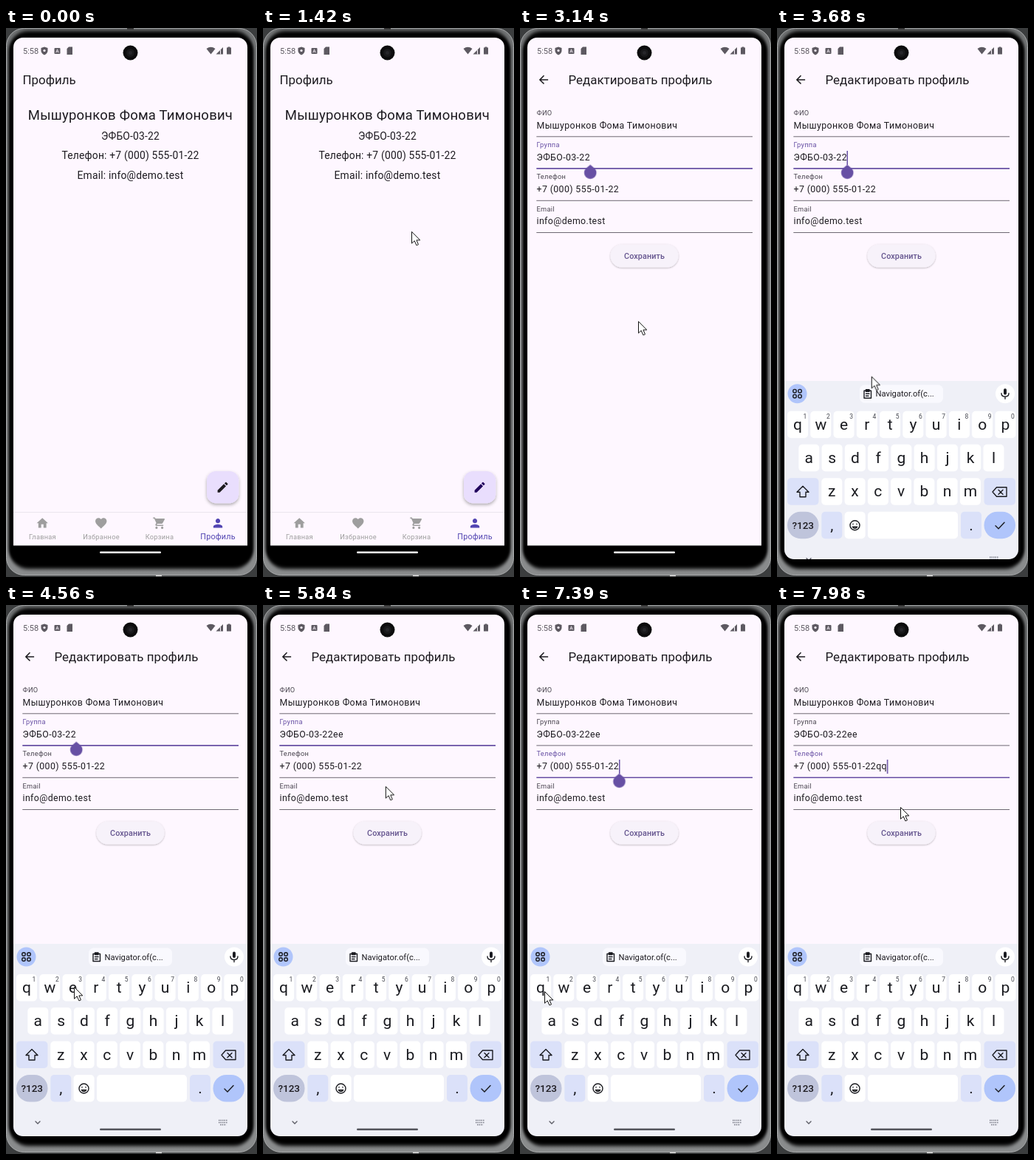
An HTML page that plays this animation: 340 by 742 pixels, repeating every 8000 ms.

```html
<!DOCTYPE html>
<html lang="ru">
<head>
<meta charset="utf-8">
<title>Профиль</title>
<style>
html, body { margin: 0; width: 100%; height: 100%; overflow: hidden; background: #3b3d3e; }
svg { display: block; }
text { font-family: Roboto, sans-serif; fill: #1d1b20; }
.mid { text-anchor: middle; }
.title { font-size: 16.9px; }
.info { font-size: 13.88px; letter-spacing: .19px; }
.label { font-size: 9.25px; letter-spacing: .3px; fill: currentColor; }
.value { font-size: 12.34px; letter-spacing: .39px; }
.tab { font-size: 9.25px; letter-spacing: .25px; fill: #9e9e9e; }
.key { font-size: 21px; fill: #1a1b20; }
.hint { font-size: 8.5px; fill: #44464f; }
.field { color: #49454f; stroke-width: .8px; }
.field line { stroke: currentColor; }
.accent { fill: #6750a4; }
.line { fill: none; stroke: #1a1b20; stroke-width: 1.4; stroke-linecap: round; stroke-linejoin: round; }

.step { animation: 8s step-end infinite; }
.pencil { animation-name: pencil; }
.profile { animation-name: profile; }
.edit { animation-name: edit; }
.group { animation-name: group; }
.phone { animation-name: phone; }
.grip1 { animation-name: grip1; }
.grip2 { animation-name: grip2; }
.caret1 { animation-name: caret1; }
.caret2 { animation-name: caret2; }
.e1 { animation-name: e1; }
.e2 { animation-name: e2; }
.q1 { animation-name: q1; }
.q2 { animation-name: q2; }
.press-e { animation-name: pressE; }
.press-q { animation-name: pressQ; }
.keyboard { animation: keyboard 8s linear infinite; }
.cursor { animation: cursor 8s linear infinite; }

@keyframes pencil { 0% { fill: #1d1b20; } 9%, 100% { fill: #21005d; } }
@keyframes profile { 0% { visibility: visible; } 18.625%, 100% { visibility: hidden; } }
@keyframes edit { 0% { opacity: 0; } 18.625%, 100% { opacity: 1; } }
@keyframes group {
  0%, 75.75%, 100% { color: #49454f; stroke-width: .8px; }
  35% { color: #6750a4; stroke-width: 1.6px; }
}
@keyframes phone {
  0% { color: #49454f; stroke-width: .8px; }
  75.75%, 100% { color: #6750a4; stroke-width: 1.6px; }
}
@keyframes grip1 { 0%, 58.75%, 100% { opacity: 0; } 35% { opacity: 1; } }
@keyframes grip2 { 0%, 94%, 100% { opacity: 0; } 75.75% { opacity: 1; } }
@keyframes caret1 {
  0%, 38.75%, 51.125% { opacity: 0; transform: none; }
  35%, 45.125%, 57.875% { opacity: 1; transform: none; }
  58.75% { opacity: 1; transform: translateX(7px); }
  62% { opacity: 1; transform: translateX(14px); }
  68.375%, 100% { opacity: 0; transform: translateX(14px); }
}
@keyframes caret2 {
  0%, 81.375% { opacity: 0; transform: none; }
  75.75%, 87.375% { opacity: 1; transform: none; }
  94% { opacity: 1; transform: translateX(7.4px); }
  95.75%, 100% { opacity: 1; transform: translateX(14.8px); }
}
@keyframes e1 { 0% { visibility: hidden; } 58.75%, 100% { visibility: visible; } }
@keyframes e2 { 0% { visibility: hidden; } 62%, 100% { visibility: visible; } }
@keyframes q1 { 0% { visibility: hidden; } 94%, 100% { visibility: visible; } }
@keyframes q2 { 0% { visibility: hidden; } 95.75%, 100% { visibility: visible; } }
@keyframes pressE { 0%, 58.75%, 62%, 100% { opacity: 0; } 57.875%, 61.125% { opacity: .1; } }
@keyframes pressQ { 0%, 94%, 95.75%, 100% { opacity: 0; } 93.125%, 94.875% { opacity: .1; } }
@keyframes keyboard {
  0%, 42.875% { transform: translateY(262px); animation-timing-function: ease-out; }
  46.875%, 100% { transform: none; }
}
@keyframes cursor {
  0%, 2.4% { transform: translate(345px, 745px); }
  2.5% { transform: translate(336px, 732px); }
  5.625% { transform: translate(312px, 640px); }
  8.125% { transform: translate(293px, 570px); }
  11.75%, 13.5% { transform: translate(291px, 615px); }
  17.75% { transform: translate(201px, 275px); }
  19.5% { transform: translate(193px, 242px); }
  21.25% { transform: translate(190px, 238px); }
  24.875%, 27.375% { transform: translate(139px, 175px); }
  29.75% { transform: translate(125px, 160px); }
  33.25% { transform: translate(172px, 263px); }
  35% { transform: translate(172px, 280px); }
  39.25% { transform: translate(160px, 396px); }
  44.25% { transform: translate(140px, 455px); }
  51.125%, 62.5% { transform: translate(92px, 516px); }
  70.5% { transform: translate(181px, 262px); }
  73% { transform: translate(166px, 245px); }
  75%, 76.625% { transform: translate(134px, 216px); }
  80.5% { transform: translate(42px, 508px); }
  82.5%, 95.5% { transform: translate(33px, 522px); }
  99.75%, 100% { transform: translate(167px, 273px); }
}
</style>
</head>
<body>
<svg width="340" height="742" viewBox="0 0 340 742">
  <defs>
    <clipPath id="screen"><rect x="10" y="13" width="317" height="705" rx="13"/></clipPath>
    <filter id="shadow" x="-30%" y="-30%" width="160%" height="180%">
      <feDropShadow dx="0" dy="2.2" stdDeviation="2" flood-opacity=".32"/>
    </filter>
    <filter id="soft" x="-10%" y="-20%" width="120%" height="160%">
      <feDropShadow dx="0" dy=".8" stdDeviation=".8" flood-opacity=".3"/>
    </filter>
    <filter id="bevel"><feGaussianBlur stdDeviation="1.5 2.5"/></filter>
    <linearGradient id="metal" x2="0" y2="1">
      <stop stop-color="#707273"/><stop offset="1" stop-color="#8a8c8d"/>
    </linearGradient>
    <path id="grip" d="M0 0 5.9 5.1A8.3 8.3 0 1 1-5.9 5.1Z"/>
  </defs>

  <!-- phone body -->
  <rect x=".5" y=".5" width="339" height="739" rx="24" fill="url(#metal)" stroke="#a8aaab"/>
  <rect x="3.500" y="4" width="332" height="727" rx="27" filter="url(#bevel)"/>
  <path d="M164 1h9" stroke="#333" stroke-width="2"/>
  <path d="M203 740h8" stroke="#ccc" stroke-width="2"/>

  <g clip-path="url(#screen)">
    <rect x="10" y="13" width="317" height="705"/>
    <rect x="10" y="13" width="317" height="686.5" fill="#fef7ff"/>
    <rect x="127" y="707.5" width="83" height="2.5" rx="1.2" fill="#fff"/>

    <!-- status bar -->
    <g fill="#5d5961">
      <text x="23" y="34.5" font-size="11" style="fill:#5d5961">5:58</text>
      <path d="M52 25.5 56.5 27V31Q56 34.500 52 36.500Q48 34.500 47.500 31V27Z"/>
      <circle cx="52" cy="30.500" r="1.6" fill="#fef7ff"/>
      <rect x="65.500" y="27" width="8" height="8" rx="1"/>
      <path d="M67.700 33.300 69.500 28.800 71.300 33.300M68.200 32H70.800" fill="none" stroke="#fef7ff" stroke-width=".8"/>
      <path d="M85 25.500H90V36H82.500V28Z"/>
      <path d="M271.500 28Q277.500 23.500 283.500 28L277.500 35.500Z"/>
      <path d="M294 26V35.500H284.500Z"/>
      <path d="M290.500 29.500V35.500" stroke="#fef7ff"/>
      <path d="M300.500 25.500H303.500V26.500H305V35.500H299V26.500H300.500Z"/>
    </g>

    <!-- profile page -->
    <g class="step profile">
      <text class="title" x="22.500" y="76">Профиль</text>
      <text class="mid" x="168.500" y="124" font-size="18.5" letter-spacing=".22">Мышуронков Фома Тимонович</text>
      <g class="info mid">
        <text x="168.500" y="151">ЭФБО-03-22</text>
        <text x="168.500" y="177">Телефон: +7 (000) 555-01-22</text>
        <text x="168.500" y="203.500">Email: info@demo.test</text>
      </g>
      <rect x="272" y="599" width="43.200" height="43.200" rx="12.300" fill="#e9defd" filter="url(#shadow)"/>
      <path class="step pencil" transform="translate(284.300 611.500) scale(.77)" d="M3 17.250V21h3.750L17.810 9.940l-3.750-3.750zM20.710 7.040a1 1 0 0 0 0-1.410l-2.340-2.340a1 1 0 0 0-1.410 0l-1.830 1.830 3.750 3.750z"/>
      <path d="M10 654.500H327" stroke="#ebe5ed"/>
      <g fill="#9e9e9e">
        <path transform="translate(40 660) scale(.77)" d="M10 20v-6h4v6h5v-8h3L12 3 2 12h3v8z"/>
        <path transform="translate(119.500 660) scale(.77)" d="M12 21.350l-1.450-1.320C5.400 15.360 2 12.280 2 8.500 2 5.420 4.420 3 7.500 3c1.740 0 3.410.81 4.500 2.090C13.090 3.810 14.760 3 16.500 3 19.580 3 22 5.420 22 8.500c0 3.780-3.400 6.860-8.550 11.540z"/>
        <g transform="translate(198.500 660) scale(.77)">
          <path d="M1 2V4H3L6.600 11.600 5.200 14C4.500 15.400 5.500 17 7 17H19V15H7.400L8.500 13H16Q17.200 13 17.700 12L21.300 5.500Q21.700 4 20.400 4H5.200L4.300 2Z"/>
          <circle cx="7" cy="20" r="2"/><circle cx="17" cy="20" r="2"/>
        </g>
        <path fill="#5245b2" transform="translate(277.800 660) scale(.77)" d="M12 12c2.210 0 4-1.790 4-4s-1.790-4-4-4-4 1.790-4 4 1.790 4 4 4zm0 2c-2.670 0-8 1.340-8 4v2h16v-2c0-2.660-5.330-4-8-4z"/>
      </g>
      <g class="mid">
        <text class="tab" x="49.500" y="691">Главная</text>
        <text class="tab" x="129" y="691">Избранное</text>
        <text class="tab" x="208" y="691">Корзина</text>
        <text x="287" y="691" font-size="10.8" letter-spacing=".2" style="fill:#5245b2">Профиль</text>
      </g>
    </g>

    <!-- edit page -->
    <g class="step edit">
      <path transform="translate(22.700 60.700) scale(.77)" fill="#1d1b20" d="M20 11H7.830l5.590-5.590L12 4l-8 8 8 8 1.410-1.410L7.830 13H20z"/>
      <text class="title" x="65.500" y="76">Редактировать профиль</text>
      <g class="field">
        <text class="label" x="22.500" y="118">ФИО</text>
        <text class="value" x="22.500" y="136">Мышуронков Фома Тимонович</text>
        <line x1="22.300" x2="315" y1="146.800" y2="146.800"/>
      </g>
      <g class="field step group">
        <text class="label" x="22.500" y="161">Группа</text>
        <text class="value" x="22.500" y="179">ЭФБО-03-22<tspan class="step e1">е</tspan><tspan class="step e2">е</tspan></text>
        <line x1="22.300" x2="315" y1="189.900" y2="189.900"/>
      </g>
      <g class="field step phone">
        <text class="label" x="22.500" y="204.300">Телефон</text>
        <text class="value" x="22.500" y="222">+7 (000) 555-01-22<tspan class="step q1">q</tspan><tspan class="step q2">q</tspan></text>
        <line x1="22.300" x2="315" y1="233.300" y2="233.300"/>
      </g>
      <g class="field">
        <text class="label" x="22.500" y="247.500">Email</text>
        <text class="value" x="22.500" y="265.300">info@demo.test</text>
        <line x1="22.300" x2="315" y1="276.500" y2="276.500"/>
      </g>
      <g class="accent">
        <rect class="step caret1" x="94.500" y="166" width="1.500" height="19"/>
        <rect class="step caret2" x="134" y="209" width="1.500" height="19"/>
        <g transform="translate(95.200 184.700)"><use class="step grip1" href="#grip"/></g>
        <g transform="translate(134.500 227.700)"><use class="step grip2" href="#grip"/></g>
      </g>
      <rect x="122.500" y="292.500" width="92" height="31" rx="15.500" fill="#f7f2fa" filter="url(#soft)"/>
      <text class="mid" x="168.500" y="312" font-size="10.8" font-weight="500" letter-spacing=".08" style="fill:#65558f">Сохранить</text>
    </g>

    <!-- keyboard -->
    <g class="keyboard">
      <rect x="10" y="458" width="317" height="262" fill="#eff0f7"/>
      <circle cx="27.500" cy="475.500" r="13" fill="#b0c5fb"/>
      <g class="line">
        <circle cx="24" cy="472" r="2.300"/><circle cx="31" cy="472" r="2.300"/>
        <circle cx="24" cy="479" r="2.300"/><circle cx="31" cy="479" r="2.300"/>
      </g>
      <rect x="112" y="463.500" width="113" height="24.500" rx="7" fill="#f9f9fe"/>
      <path class="line" d="M118 471.500H127.500V481.500H118ZM120.500 471.500V470H125V472.500H120.500M120.500 475.500H125M120.500 478.500H124"/>
      <text x="133.500" y="479.500" font-size="11.200">Navigator.of(c...</text>
      <circle cx="309" cy="475.500" r="13" fill="#fff"/>
      <rect x="307" y="468.500" width="4" height="8.500" rx="2" fill="#1a1b20"/>
      <path class="line" d="M304 475Q304 479.500 309 479.500T314 475M309 480V482.500"/>
      <g id="keys"></g>
      <rect class="step press-q" x="14" y="499" width="28" height="36.500" rx="5"/>
      <rect class="step press-e" x="76.500" y="499" width="28" height="36.500" rx="5"/>
      <g class="line">
        <path d="M35 600.500 43 608.500H39V615H31V608.500H27Z"/>
        <path d="M297.500 602H311V614.500H297.500L292 608.300ZM300 605.500 306 611.500M306 605.500 300 611.500"/>
        <circle cx="105.500" cy="653.500" r="6.500"/>
        <path d="M103 651.500V652M108 651.500V652M102.300 655.500Q105.500 659.500 108.700 655.500Z"/>
        <path d="M296 654 300 658 308 649.500"/>
        <path d="M40 698 43 701 46 698" stroke="#5c5d66"/>
      </g>
      <path d="M288 696.500H300M288 699.500H300M290 702.500H298" fill="none" stroke="#777984" stroke-width="1.500" stroke-dasharray="1.500 1"/>
      <rect x="127" y="707.500" width="83" height="2.500" rx="1.200" fill="#55565d"/>
    </g>
  </g>

  <!-- camera -->
  <circle cx="168.500" cy="33.500" r="10" fill="#0c0c0d"/>
  <circle cx="168.500" cy="33.500" r="5.500" fill="#19191b"/>
  <circle cx="168.500" cy="33.500" r="2.500" fill="#26262a"/>

  <g class="cursor">
    <path d="M.5.5V16.200L4.200 12.800 6.900 18.900 9.500 17.800 6.900 11.900H11.800Z" fill="#fff" stroke="#111" stroke-width="1"/>
  </g>
</svg>
<script>
const keys = document.getElementById('keys');
const WHITE = '#fff', PALE = '#dbe1f9';
let out = '';

function key(x, y, w, fill, label = '', cls = 'key', r = 5) {
  out += `<rect x="${x}" y="${y}" width="${w}" height="36.5" rx="${r}" fill="${fill}"/>`;
  const base = cls === 'key' ? y + 25 : y + 23;
  if (label) out += `<text class="mid ${cls}" x="${x + w / 2}" y="${base}">${label}</text>`;
}

function row(letters, x, y, hints) {
  [...letters].forEach((ch, i) => {
    const left = x + i * 31.27;
    key(left, y, 28, WHITE, ch);
    if (hints) out += `<text class="mid hint" x="${left + 24}" y="${y + 10}">${(i + 1) % 10}</text>`;
  });
}

row('qwertyuiop', 14, 499, true);
row('asdfghjkl', 29.3, 544);
row('zxcvbnm', 60.3, 589.5);
key(14, 589.5, 42.5, PALE);
key(280.5, 589.5, 42.5, PALE);
key(14, 635, 42.5, '#bfc4db', '?123', 'mode', 18);
key(60.3, 635, 28, PALE, ',');
key(91.6, 635, 28, WHITE);
key(123, 635, 122, WHITE);
key(249, 635, 28, PALE, '.');
key(280.5, 635, 42.5, '#b0c5fb', '', '', 18);
keys.innerHTML = out;
keys.querySelector('.mode').style.cssText = 'font-size:13.5px;font-weight:500';
</script>
</body>
</html>
```
